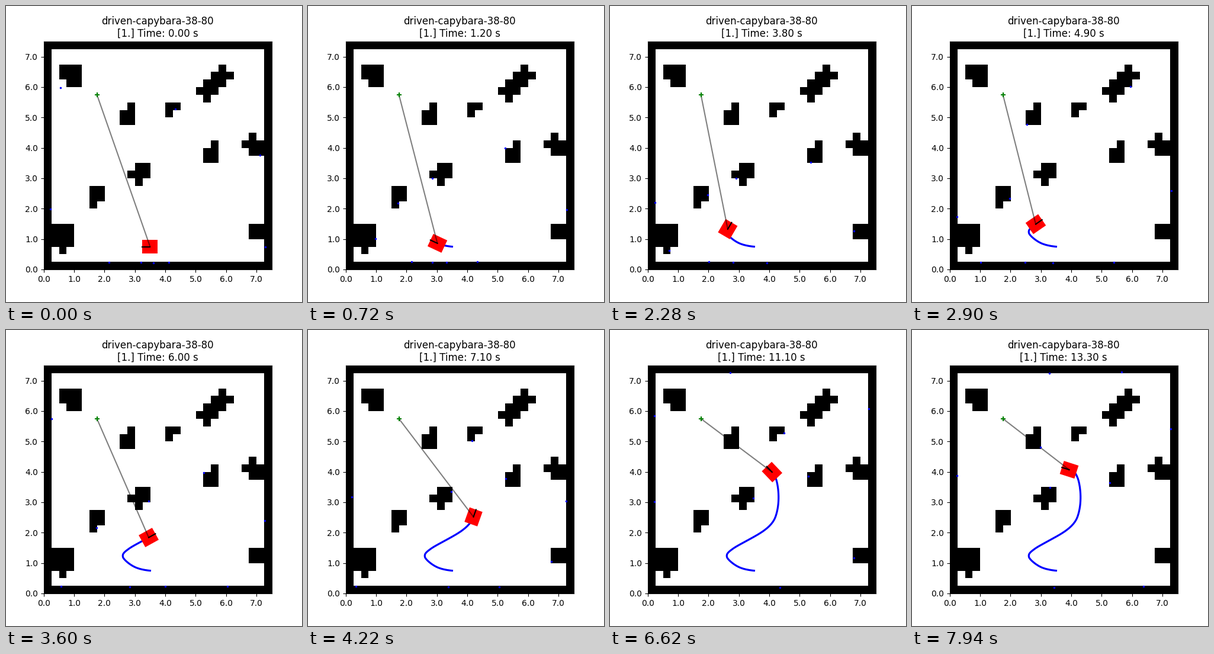
These frames come from a looping animation (500 px wide and 500 px high, 8000 ms). A matplotlib script:

```python
import numpy as np
import matplotlib.pyplot as plt
from matplotlib.animation import FuncAnimation

CELL, SIZE = 0.25, 30
STEP, REACH = 0.05, 6.0
GOAL = np.array([1.75, 5.75])
LENGTH, WIDTH = 0.505, 0.45
RAYS = np.radians(180 + 39.8 * np.arange(-4, 5))


def square(row, col, size):
    grid[row:row + size, col:col + size] = 1


def cross(row, col):
    grid[row - 1:row + 2, col] = 1
    grid[row, col - 1:col + 2] = 1


grid = np.ones((SIZE, SIZE))
grid[1:-1, 1:-1] = 0
SQUARES = {
    1: [(8, 11), (8, 16), (8, 17), (9, 16), (13, 22), (21, 6), (27, 2)],
    2: [(3, 2), (3, 3), (4, 3), (9, 10), (13, 27), (14, 21), (16, 12), (19, 6), (24, 27)],
    3: [(24, 1)],
}
for size, corners in SQUARES.items():
    for row, col in corners:
        square(row, col, size)
for k in range(3):
    cross(4 + k, 23 - k)
cross(13, 27)
cross(17, 12)
grid = grid[::-1]  # row 0 at the bottom, as in world coordinates

# key poses: tick (0.1 s), x, y, heading in degrees, speed in m/s
POSES = np.array([
    (0, 3.500, 0.750, 180, 0.00),
    (13, 2.966, 0.884, 152, 0.55),
    (26, 2.606, 1.198, 101, 0.12),
    (49, 2.830, 1.490, 34.6, 0.35),
    (60, 3.454, 1.841, 29, 0.92),
    (71, 4.203, 2.520, 70.4, 0.90),
    (89, 4.213, 3.790, 111.1, 0.32),
    (97, 4.158, 3.913, 118, 0.08),
    (133, 3.930, 4.070, 162.2, 0.09),
])


def hermite(t, knots, vals, slopes):
    i = np.clip(np.searchsorted(knots, t, side="right") - 1, 0, len(knots) - 2)
    h = knots[i + 1] - knots[i]
    u = (t - knots[i]) / h
    return ((1 + 2 * u) * (1 - u) ** 2 * vals[i]
            + u * (1 - u) ** 2 * h * slopes[i]
            + u * u * (3 - 2 * u) * vals[i + 1]
            + u * u * (u - 1) * h * slopes[i + 1])


knots, key_x, key_y, deg, speed = POSES.T
rad = np.radians(deg)
ticks = np.arange(134)
path_x = hermite(ticks, knots, key_x, 0.1 * speed * np.cos(rad))
path_y = hermite(ticks, knots, key_y, 0.1 * speed * np.sin(rad))
heading = hermite(ticks, knots, rad, np.gradient(rad, knots))


def scan(x, y, angle):
    """End points of the rays, marched until they meet an obstacle."""
    rays = angle + RAYS[:, None]
    dist = np.arange(1, round(REACH / STEP) + 1) * STEP
    px, py = x + dist * np.cos(rays), y + dist * np.sin(rays)
    col, row = (np.clip(np.floor((p - 1e-6) / CELL).astype(int), 0, SIZE - 1)
                for p in (px, py))
    hit = grid[row, col] > 0
    hit[:, -1] = True
    first = np.arange(len(RAYS)), hit.argmax(axis=1)
    return px[first], py[first]


def body(x, y, angle):
    corners = np.array([(1, 1), (-1, 1), (-1, -1), (1, -1)]) * (LENGTH / 2, WIDTH / 2)
    c, s = np.cos(angle), np.sin(angle)
    return corners @ np.array([(c, s), (-s, c)]) + (x, y)


fig, ax = plt.subplots(figsize=(5, 5), dpi=100)
side = SIZE * CELL
ax.imshow(grid, cmap="gray_r", extent=(0, side, 0, side), origin="lower",
          interpolation="nearest")
marks = np.arange(8)
labels = [f"{m:.1f}" for m in marks]
ax.set_xticks(marks, labels)
ax.set_yticks(marks, labels)

trail, = ax.plot([], [], color="blue", lw=2.3, zorder=2)
robot = ax.fill([0, 0, 0], [0, 0, 0], color="red", lw=0, zorder=3)[0]
sight, = ax.plot([], [], color="black", alpha=0.5, lw=1.5, zorder=4)
nose, = ax.plot([], [], color="black", lw=1.5, zorder=5)
hits, = ax.plot([], [], ".", color="blue", ms=3, zorder=6)
ax.plot(*GOAL, "+", color="green", ms=6, mew=1.5, zorder=6)
ax.set_xlim(0, side)
ax.set_ylim(0, side)
title = ax.set_title("")


def update(i):
    # ticks last 20 ms and 100 ms in turn
    pair, rest = divmod(i, 6)
    n = min(2 * pair + (rest >= 1), len(ticks) - 1)
    x, y, a = path_x[n], path_y[n], heading[n]
    trail.set_data(path_x[:n + 1], path_y[:n + 1])
    robot.set_xy(body(x, y, a))
    sight.set_data([GOAL[0], x], [GOAL[1], y])
    nose.set_data([x, x + LENGTH / 2 * np.cos(a)], [y, y + LENGTH / 2 * np.sin(a)])
    hits.set_data(*scan(x, y, a))
    title.set_text(f"driven-capybara-38-80\n[1.] Time: {n / 10:.2f} s")
    return trail, robot, sight, nose, hits, title


anim = FuncAnimation(fig, update, frames=400, interval=20, repeat=True, repeat_delay=0)
plt.show()
```
